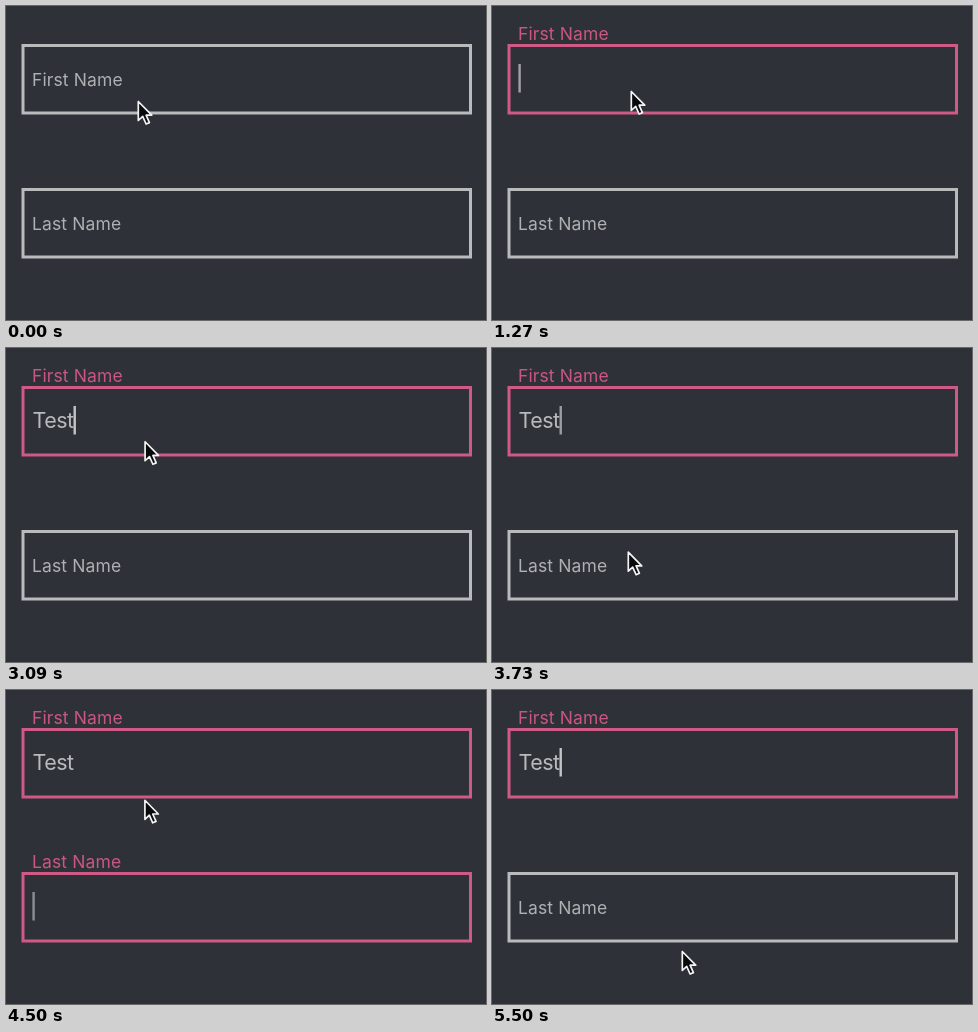
An HTML page with a canvas that plays this animation: 480x314 px, repeating every 5550 ms.

```html
<!DOCTYPE html>
<html lang="en">
<head>
<meta charset="utf-8">
<title>Floating labels</title>
<style>
  html, body { margin: 0; width: 100%; height: 100%; overflow: hidden; background: #2e3138; }
  canvas { display: block; }
</style>
</head>
<body>
<canvas id="stage" width="480" height="314"></canvas>
<script>
const ctx = document.getElementById('stage').getContext('2d');
const LOOP = 5550;
const FONT = 'Inter, "Open Sans", sans-serif';
const GREY = [184, 186, 187], PINK = [206, 90, 133];
const LABEL = [174, 176, 178], LABEL_PINK = [204, 86, 130];

const FOCUS_FIRST = 500, FOCUS_LAST = 3740, REFOCUS_FIRST = 4960;
const KEYS = [1640, 2000, 2410, 2550];
const ACTIVITY = [FOCUS_FIRST, ...KEYS, FOCUS_LAST, REFOCUS_FIRST];

const MOVES = [
  { start: 20, end: 230, x: 138.5, y: 84, power: 1 },
  { start: 3050, end: 3640, x: 135.5, y: 202.7, power: 1 },
  { start: 4235, end: 4770, x: 139, y: 77, power: 2 },
  { start: 4960, end: 5500, x: 189.5, y: 260, power: 1 }
];

const mix = (a, b, p) => a + (b - a) * p;
const clamp = v => Math.min(1, Math.max(0, v));
const blend = (a, b, p) => `rgb(${a.map((v, i) => Math.round(mix(v, b[i], p)))})`;

// Underdamped spring from 0 to 1
function spring(ms) {
  if (ms <= 0) return 0;
  const s = ms / 1000, w = 17.4 * s;
  return 1 - Math.exp(-8.9 * s) * (Math.cos(w) + 0.512 * Math.sin(w));
}

function pointerAt(t) {
  let x = 131.5, y = 94;
  for (const move of MOVES) {
    const p = 1 - (1 - clamp((t - move.start) / (move.end - move.start))) ** move.power;
    x = mix(x, move.x, p);
    y = mix(y, move.y, p);
  }
  return [x, y];
}

// The caret stays solid after any activity, then fades out and in periodically
function caretAlpha(t) {
  const idle = t - ACTIVITY.filter(a => a <= t).pop() - 540;
  if (!(idle > 0)) return 1;
  const p = (idle % 620) / 250;
  return p < 1 ? clamp(Math.abs(2 * p - 1) * 1.6 - 0.6) : 1;
}

function drawField(top, label, lift, value, focused, t) {
  ctx.lineWidth = 3;
  ctx.strokeStyle = blend(GREY, PINK, clamp(lift));
  ctx.strokeRect(17, top + 1.5, 447.5, 67.5);

  ctx.save();
  ctx.beginPath();
  ctx.rect(0, top - 22, 480, 120);
  ctx.clip();
  ctx.font = `17.5px ${FONT}`;
  ctx.letterSpacing = '0.12px';
  ctx.fillStyle = blend(LABEL, LABEL_PINK, lift);
  ctx.fillText(label, 26, top + 42 - 46 * lift);
  ctx.restore();

  ctx.font = `21.5px ${FONT}`;
  ctx.letterSpacing = '-0.5px';
  ctx.fillStyle = '#b8babb';
  ctx.fillText(value, 26.5, top + 42);
  if (focused) {
    ctx.globalAlpha = caretAlpha(t);
    ctx.fillStyle = '#c4c6c8';
    ctx.fillRect(26.4 + ctx.measureText(value).width, top + 20, 2.4, 28.5);
    ctx.globalAlpha = 1;
  }
}

function drawPointer(x, y) {
  ctx.save();
  ctx.translate(x, y);
  const arrow = new Path2D('M.8 1.5V20.5L5.2 16.4 8.6 24 11.9 22.6 8.6 15.2H14.2Z');
  ctx.lineJoin = 'round';
  ctx.lineWidth = 1.7;
  ctx.fillStyle = '#08090b';
  ctx.strokeStyle = '#f2f3f4';
  ctx.fill(arrow);
  ctx.stroke(arrow);
  ctx.restore();
}

function draw(t) {
  ctx.fillStyle = '#2e3138';
  ctx.fillRect(0, 0, 480, 314);

  const typed = 'Test'.slice(0, KEYS.filter(k => t >= k).length);
  const inLast = t >= FOCUS_LAST && t < REFOCUS_FIRST;
  const inFirst = t >= FOCUS_FIRST && !inLast;

  drawField(38, 'First Name', spring(t - 440), typed, inFirst, t);
  drawField(182, 'Last Name', spring(t - 3730) - spring(t - 4930), '', inLast, t);
  drawPointer(...pointerAt(t));
}

function tick() {
  draw(performance.now() % LOOP);
  requestAnimationFrame(tick);
}
tick();
</script>
</body>
</html>
```
